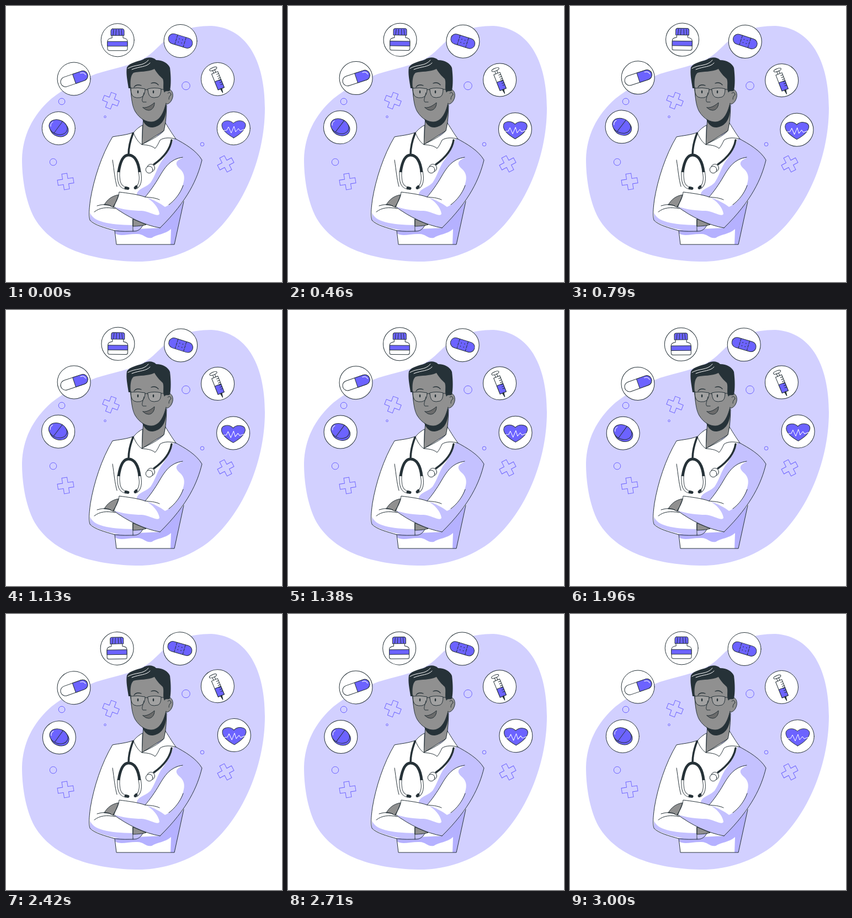
Recreate the animation shown at these times as an HTML page. Size 500x500 px, loop 3040 ms.

```html
<!DOCTYPE html>
<html lang="en">
<head>
<meta charset="utf-8">
<title>Doctor with medical icons</title>
<style>
  html, body { margin: 0; width: 100%; height: 100%; overflow: hidden; background: #fff; }
  svg { display: block; width: 100%; height: 100%; }
  .ink { stroke: #263238; stroke-width: 1; stroke-linecap: round; stroke-linejoin: round; }
  .none { fill: none; }
  .white { fill: #fff; }
  .dark { fill: #263238; }
  .tint { fill: #d2d0ff; }
  .shade { fill: #c4c1ff; }
  .deep { fill: #b5b1ff; }
  .main { fill: #6c63ff; }
  .skin { fill: #909090; }
  .deco { fill: none; stroke: #6c63ff; stroke-width: 1; }
  .shine { fill: none; stroke: #fff; stroke-width: 1; stroke-linecap: round; stroke-linejoin: round; }
</style>
</head>
<body>
<svg viewBox="0 0 500 500">
  <defs>
    <path id="cross" d="M-5-15H5V-5H15V5H5V15H-5V5H-15V-5H-5Z"/>
    <circle id="disc" r="30"/>
  </defs>

  <path class="tint" d="M372 36C440 40 469 105 469 185C469 280 425 375 365 422C320 455 270 464 235 463C155 461 85 440 52 385C34 352 29 308 29 278C30 235 48 198 82 168C110 146 135 134 163 123C195 113 225 108 250 95C285 75 290 37 372 36Z"/>

  <g class="deco">
    <use href="#cross" transform="translate(190 171.500) rotate(21) scale(.96)"/>
    <use href="#cross" transform="translate(108 318) rotate(-9) scale(.96)"/>
    <use href="#cross" transform="translate(398 286) rotate(-28) scale(.96)"/>
    <circle cx="101" cy="173" r="5.800"/>
    <circle cx="179.500" cy="200.700" r="1.800"/>
    <circle cx="85.500" cy="282.700" r="6.200"/>
    <circle cx="326" cy="144.500" r="7.300"/>
    <circle cx="355.500" cy="250.500" r="3.300"/>
  </g>

  <!-- coat -->
  <path class="white" d="M231 229C218 234 203 235 193 237C173 270 159 314 153 350C150 372 150 381 152 388C160 397 180 402 197 407L200 432H305L322 354L304 239Z"/>
  <path class="deep" d="M197 406L279 402L322 354L305 432H298L299 404C288 414 274 413 264 420C252 422 250 412 236 413C220 413 206 418 198 412Z"/>
  <path class="shade" d="M304 239C325 250 345 262 355 279C347 312 330 352 279 402C250 396 222 384 196 364L237 342C237 331 254 329 262 320C270 308 272 298 280 284C290 270 298 258 304 239Z"/>
  <path class="white" d="M252 346C262 335 270 323 278 309C288 292 298 277 320 275C306 281 306 287 315 295C324 303 324 312 321 322C316 341 303 358 288 364C280 358 268 351 252 346Z"/>
  <path class="shade" d="M152 374C158 391 185 396 230 397V408C205 408 170 401 152 388Z"/>
  <path class="white" d="M205 337C220 339 238 341 252 346C266 352 276 365 278 376C277 384 260 372 246 371C230 371 212 369 194 363C200 355 204 347 205 337Z"/>
  <path class="shade" d="M230 397H248Q244 408 232 408Z"/>
  <path class="skin ink" d="M178 360C184 350 192 344 204 342L195 365Q187 360 178 360Z"/>
  <path class="skin ink" d="M230 386L254 396C248 398 239 399 230 399Z"/>
  <g class="ink none">
    <path d="M231 229C218 234 203 235 193 237C173 270 159 314 153 350C150 372 150 381 152 388C160 397 180 402 197 407L200 432H305L322 354"/>
    <path d="M304 239C325 250 345 262 355 279C347 312 330 352 279 402"/>
    <path d="M197 407C210 409 222 408 232 408C240 408 245 403 248 397M230 386V408"/>
    <path d="M320 274C298 277 288 292 278 309C270 323 260 337 252 346"/>
    <path d="M321 325C316 339 306 352 295 360"/>
    <path d="M193 279C196 298 197 313 201 327M165 362Q180 357 190 362"/>
    <path d="M160 373C170 365 182 364 198 367"/>
    <path d="M278 351C270 347 261 347 252 346C238 341 220 339 205 337C204 347 200 355 194 363C220 382 250 397 279 402"/>
  </g>

  <!-- neck and collar -->
  <path class="skin ink" d="M249 200L246 251L286 226Q290 216 291 180Z"/>
  <path class="dark" d="M247 205C250 214 257 221 266 220C279 218 288 209 290 190V178Z"/>
  <path class="white ink" d="M247 216C240 220 234 225 231 230C235 240 240 247 246 251Z"/>
  <path class="white ink" d="M289 212C297 225 302 233 308 241C297 238 286 238 279 243C276 249 274 254 270 258C263 252 254 252 246 251C261 243 277 236 286 226Z"/>

  <!-- head -->
  <path class="skin ink" d="M288 153C295 147 304 153 302 165C300 174 294 179 288 178Z"/>
  <path class="skin" d="M223 122C224 150 227 177 234 191C242 204 254 211 265 210C279 208 286 193 290 176L289 120L262 106L236 110Z"/>
  <path class="ink none" d="M226 147C227 170 229 182 234 191C242 204 254 211 265 210C279 208 286 193 290 176M293 158Q298 154 299 161Q295 163 295 169"/>
  <path class="dark" d="M222 149C220 135 217 122 219 111C225 102 238 101 248 97C256 92 266 92 272 98C284 98 294 104 297 112C299 128 299 143 297 153C294 156 289 152 287 157C283 149 287 139 284 132C280 128 274 123 269 114C256 120 242 118 231 121C225 126 225 139 226 149Z"/>
  <path class="shine" d="M221 113C235 105 248 110 258 98M228 115C243 109 254 111 261 103"/>
  <path d="M226 149Q239 147 252 150Q252 164 243 166Q229 168 227 158ZM257 150Q269 147 281 150Q281 163 275 165Q260 169 258 158Z" class="ink" fill="#fff" fill-opacity=".15"/>
  <path class="ink none" d="M252 152Q254 150 257 152M281 151L293 151M250 157C248 165 245 171 248 174L254 174"/>
  <path d="M232 147Q236 141 245 144M263 140Q271 137 276 143" class="none" stroke="#263238" stroke-width="1.300" stroke-linecap="round"/>
  <ellipse class="dark" cx="239" cy="155.500" rx="1.300" ry="2.800"/>
  <ellipse class="dark" cx="267" cy="155.500" rx="1.300" ry="2.800"/>
  <path class="ink" fill="#6b6b6b" d="M248 184C255 185 262 181 269 175C269 184 264 189 258 189Q253 189 248 184Z"/>

  <!-- stethoscope -->
  <g class="none" stroke="#263238" stroke-linecap="round">
    <path stroke-width="3.500" d="M230 231C225 244 222 257 222 269M300 243C297 262 282 277 268 287"/>
    <path stroke-width="5" d="M204 300C203 320 207 328 217 330M242 300C245 314 243 325 236 329"/>
    <path stroke="#fff" stroke-width="3.200" d="M204 300C203 320 207 328 217 330M242 300C245 314 243 325 236 329"/>
    <path stroke-width="5" stroke-linecap="butt" d="M204 301C207 280 213 270 222 270C233 270 240 282 242 301"/>
    <path stroke-width="5" d="M217 329.500L221 330.500M234 329.500L236 327.500"/>
  </g>
  <circle class="white ink" cx="262.500" cy="293.500" r="7"/>
  <circle class="white ink" cx="259.500" cy="296.500" r="6.300"/>

  <!-- floating icons -->
  <g id="icons">
    <g class="white ink">
      <use href="#disc" x="95.300" y="221.500"/>
      <use href="#disc" x="123" y="132"/>
      <use href="#disc" x="202.200" y="61.800"/>
      <use href="#disc" x="316" y="63.500"/>
      <use href="#disc" x="383.500" y="132.500"/>
      <use href="#disc" x="412.300" y="221.700"/>
    </g>

    <g class="main ink">
      <ellipse rx="17" ry="13.500" transform="translate(96.300 222.800) rotate(22)"/>
      <ellipse rx="17" ry="13" transform="translate(94.500 219.500) rotate(22)"/>
      <path d="M102.500 209L87 230"/>
    </g>
    <path class="shine" d="M81 218Q80 213 85 210"/>

    <g transform="translate(123.500 132) rotate(-19)">
      <rect class="white ink" x="-25.500" y="-9" width="51" height="18" rx="9"/>
      <path class="main ink" d="M0-9H16.500A9 9 0 0 1 16.500 9H0Z"/>
      <path class="shine" d="M14-6Q21-6 22 0"/>
    </g>

    <g class="ink" transform="translate(0 .8)">
      <path class="white" d="M192 52H212V57Q220 58 220 63V77Q220 80 217 80H187Q184 80 184 77V63Q184 58 192 57Z"/>
      <path class="main" d="M184 63.500H220V72H184Z"/>
      <path class="main" d="M193 40.500H211Q214 41 214 44V52.500H190V44Q190 41 193 40.500Z"/>
      <path d="M195 42L194 52M199.500 42L199 52M204.500 42L205 52M209 42L210 52"/>
    </g>

    <g transform="translate(316 63.300) rotate(17)">
      <rect class="main ink" x="-22.500" y="-9.200" width="45" height="18.400" rx="9.200"/>
      <path class="ink none" stroke-dasharray="5 2" d="M-8-9V9M8-9V9"/>
      <g class="dark">
        <circle cx="-3" cy="-3" r=".8"/><circle cx="3" cy="-3" r=".8"/>
        <circle cx="-3" cy="3" r=".8"/><circle cx="3" cy="3" r=".8"/>
      </g>
    </g>

    <g class="ink" transform="translate(383 133) rotate(-22)">
      <path class="white" d="M-2-19H2V-10H-2Z"/>
      <ellipse class="white" cx="0" cy="-20.500" rx="7" ry="2.500"/>
      <path class="white" d="M-6-13H6V18H-6Z"/>
      <path class="main" d="M-6 2H6V18H-6Z"/>
      <path class="dark" d="M-1.500 18H1.500L0 26Z"/>
      <path d="M2-9H6M2-5H6M2-1H6M2 3H6M2 7H6M2 11H6"/>
    </g>

    <path class="main ink" d="M412.500 239C402 233 391 225 391 216C391 207 405 205 412 212.500C419 205 434 207 434 216C433 225 423 233 412.500 239Z"/>
    <path class="shine" d="M392 226L400 225L403 219L408 230L413 218L416 228L421 222L424 226L433 223"/>
  </g>
</svg>
<script>
  const LOOP = 3040, SWAY = 3000;
  const icons = document.getElementById('icons');

  // Linear sway: 0 to 1 degree, to -1, back to 0, then a short rest.
  function angle(t) {
    const p = Math.min(t / SWAY, 1) * 4;
    return p < 1 ? p : p < 3 ? 2 - p : p - 4;
  }

  function draw(now) {
    icons.setAttribute('transform', `rotate(${angle(now % LOOP)} 253.800 141.700)`);
    requestAnimationFrame(draw);
  }
  draw(0);
</script>
</body>
</html>
```
